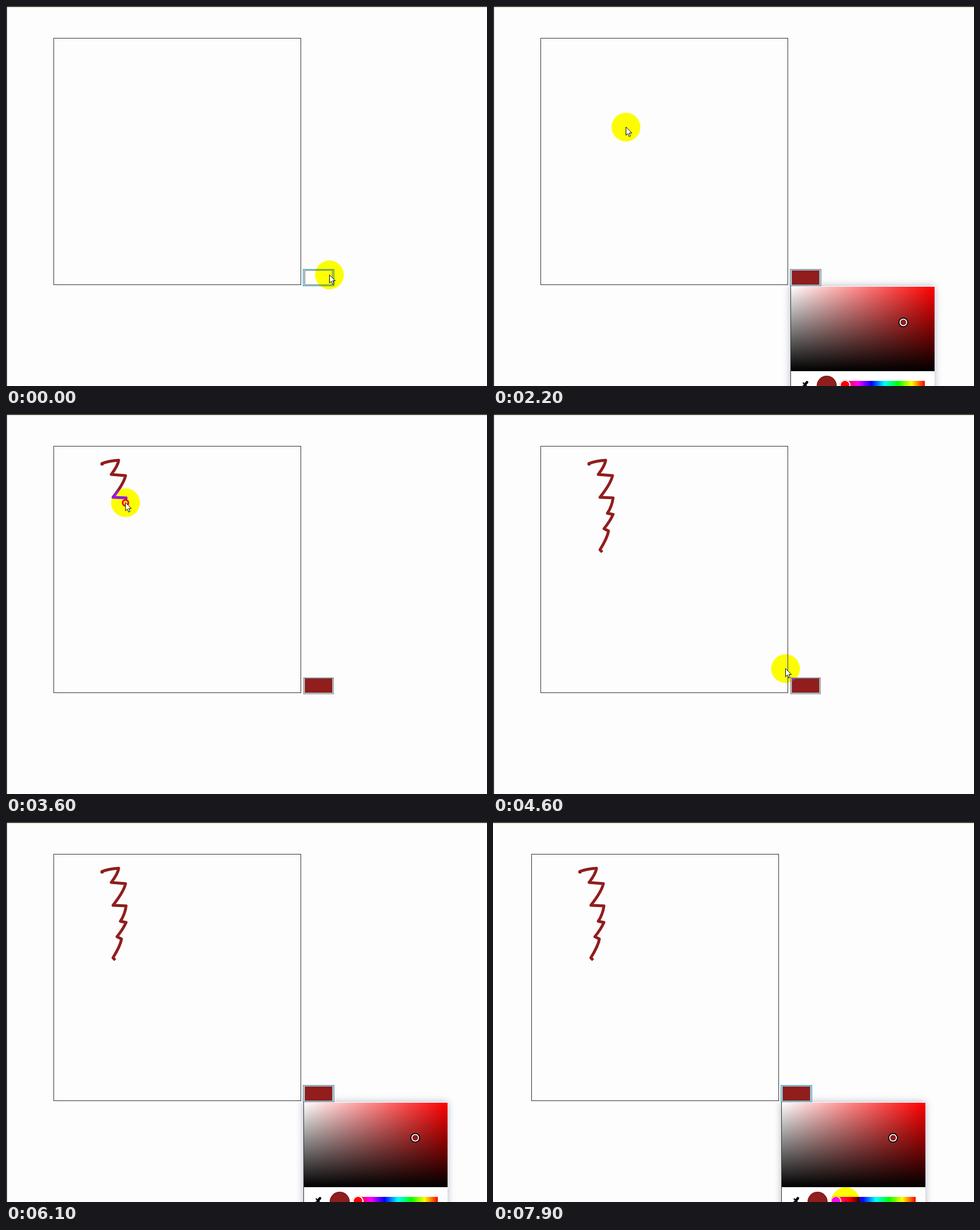
Recreate the animation shown at these times as an HTML page with a canvas. Size 841x666 px, loop 8 s.

```html
<!DOCTYPE html>
<html lang="en">
<head>
<meta charset="utf-8">
<title>Drawing with a colour picker</title>
<style>
  html, body { margin: 0; width: 100%; height: 100%; overflow: hidden; background: #fdfdfd; }
  canvas { display: block; width: 841px; height: 666px; }
</style>
</head>
<body>
<canvas id="stage" width="841" height="666"></canvas>
<script>
const ctx = document.getElementById('stage').getContext('2d');
const LOOP = 8000, STEP = 100;
const INK = '#911d1d';
const PICK = { from: 1000, to: 1800 };
const PEN = { from: 2800, to: 4160 };
const FIELD = { x: 521, y: 492, w: 251, h: 148 };

const scribble = 'M167 87Q180 82 197 81Q196 90 184 106L209 108Q206 122 187 146L210 147' +
  'Q208 162 200 174L210 176Q204 189 194 201L202 205Q200 217 187 238L191 242';
const penPath = document.createElementNS('http://www.w3.org/2000/svg', 'path');
penPath.setAttribute('d', scribble);
const penLength = penPath.getTotalLength();
const inkPath = new Path2D(scribble);
const arrow = new Path2D('M0 0V14.5L3.3 11.5 5.6 16.8 8 15.8 5.7 10.6H10.3Z');

// Where the pointer rests or turns; it eases from one place to the next
const stops = [
  { t: 200, x: 565, y: 471 }, { t: 800, x: 529, y: 484 },
  { t: PICK.from, x: 521, y: 492 }, { t: PICK.to, x: 717, y: 554 },
  { t: 1900, x: 717, y: 554 }, { t: 2200, x: 232, y: 212 },
  { t: PEN.from, x: 167, y: 87 }, { t: PEN.to, x: 191, y: 242 },
  { t: 4600, x: 511, y: 446 }, { t: 4900, x: 545, y: 472 },
  { t: 5400, x: 715, y: 553 }, { t: 6000, x: 616, y: 720 },
  { t: 6700, x: 616, y: 720 }, { t: 7300, x: 510, y: 475 },
  { t: 7900, x: 616, y: 665 }
];

const during = (t, span) => t >= span.from && t < span.to;
const within = (t, from, to) => t >= from && t < to;
const ease = k => k * k * (3 - 2 * k);
const drawn = t => penLength * Math.min(1, (t - PEN.from) / (PEN.to - PEN.from));

function pointer(t) {
  if (during(t, PEN)) return penPath.getPointAtLength(drawn(t));
  const i = stops.findIndex(s => s.t > t);
  if (i < 1) return stops[i < 0 ? stops.length - 1 : 0];
  const a = stops[i - 1], b = stops[i], k = ease((t - a.t) / (b.t - a.t));
  return { x: a.x + (b.x - a.x) * k, y: a.y + (b.y - a.y) * k };
}

function handleAt(t) {
  return pointer(t < 5400 ? Math.max(PICK.from, Math.min(t, PICK.to)) : 5400);
}

function colourAt({ x, y }, t) {
  if (t >= PICK.to) return INK;
  const s = (x - FIELD.x) / FIELD.w, v = 255 * (1 - (y - FIELD.y) / FIELD.h);
  const low = Math.round(v * (1 - s));
  return `rgb(${Math.round(v)},${low},${low})`;
}

function rect(x, y, w, h, fill) {
  ctx.fillStyle = fill;
  ctx.fillRect(x, y, w, h);
}

function frame(x, y, w, h, colour) {
  ctx.strokeStyle = colour;
  ctx.lineWidth = 1;
  ctx.strokeRect(x + 0.5, y + 0.5, w - 1, h - 1);
}

function disc(x, y, r, fill) {
  ctx.beginPath();
  ctx.arc(x, y, r, 0, Math.PI * 2);
  ctx.fillStyle = fill;
  ctx.fill();
}

function ring(x, y, r, colour, width) {
  ctx.beginPath();
  ctx.arc(x, y, r, 0, Math.PI * 2);
  ctx.strokeStyle = colour;
  ctx.lineWidth = width;
  ctx.stroke();
}

function line(x0, y0, x1, y1, width) {
  ctx.beginPath();
  ctx.moveTo(x0, y0);
  ctx.lineTo(x1, y1);
  ctx.strokeStyle = '#000';
  ctx.lineWidth = width;
  ctx.stroke();
}

function gradient(x0, y0, x1, y1, colours) {
  const g = ctx.createLinearGradient(x0, y0, x1, y1);
  colours.forEach((c, i) => g.addColorStop(i / (colours.length - 1), c));
  return g;
}

function drawInk(t) {
  if (t <= PEN.from) return;
  // While the pen moves, the ink trails slightly behind it
  const length = drawn(t) - (t < PEN.to ? 5 : 0);
  ctx.save();
  ctx.lineJoin = 'round';
  ctx.strokeStyle = INK;
  ctx.lineWidth = 5;
  ctx.setLineDash([Math.max(0, length), penLength * 2]);
  ctx.stroke(inkPath);
  ctx.restore();
  disc(168, 87.5, 3, INK);
}

function drawSwatch(t, colour) {
  const idle = within(t, 2700, 4900) || within(t, 6200, 6400);
  const picked = within(t, PICK.to, 6200);
  if (idle) {
    rect(520, 462, 53, 29, '#efefef');
    frame(520, 462, 53, 29, '#767676');
  } else {
    rect(519, 461, 55, 30, picked ? '#c6d6e2' : '#b4dfe9');
    frame(519, 461, 55, 30, picked ? '#5f7f9c' : '#3a98b4');
  }
  rect(522, 463, 49, 26, colour);
  frame(522, 463, 49, 26, '#777');
}

function drawDropper() {
  ctx.lineCap = 'round';
  line(538, 671, 545, 664, 3);
  line(542.5, 660.5, 548.5, 666.5, 2);
  line(546, 663, 549, 659.5, 4.5);
}

function drawPicker(handle, colour) {
  const { x, y, w, h } = FIELD;
  ctx.save();
  ctx.shadowColor = 'rgba(70,70,110,.4)';
  ctx.shadowBlur = 12;
  rect(x - 1, y - 1, w + 1, 220, '#fff');
  ctx.restore();

  ctx.save();
  ctx.beginPath();
  ctx.rect(x - 1, y - 1, w + 1, 220);
  ctx.clip();
  rect(x, y, w, h, gradient(x, 0, x + w, 0, ['#fff', '#f00']));
  rect(x, y, w, h, gradient(0, y, 0, y + h, ['rgba(0,0,0,0)', '#000']));
  rect(x - 1, y - 1, 1, 220, '#333');

  const hx = handle.x + 0.5, hy = handle.y + 0.5;
  disc(hx, hy, 8.5, '#000');
  disc(hx, hy, 6.8, '#fff');
  disc(hx, hy, 5, colour);

  drawDropper();
  disc(583.5, 665.5, 17.5, colour);
  ring(583.5, 665.5, 17, 'rgba(0,0,0,.25)', 1);
  rect(615, 657, 140, 12, gradient(615, 0, 755, 0,
    ['#f00', '#f0f', '#00f', '#0ff', '#0f0', '#ff0', '#f00']));
  disc(615.5, 664.5, 9.8, '#bbb');
  disc(615.5, 664.5, 9.2, '#fff');
  disc(615.5, 664.5, 7.5, '#f00');
  ctx.restore();
}

function drawPointer(t) {
  const { x, y } = pointer(t);
  // Difference with blue turns white into yellow
  ctx.globalCompositeOperation = 'difference';
  disc(x + 0.5, y + 0.3, 25.2, '#00f');
  ctx.globalCompositeOperation = 'source-over';

  if (during(t, PEN) || during(t, PICK)) ring(x + 0.5, y + 0.5, 5, '#f00014', 3);

  ctx.save();
  ctx.translate(x + 0.5, y);
  ctx.fillStyle = '#fff';
  ctx.strokeStyle = '#000';
  ctx.lineWidth = 1;
  ctx.fill(arrow);
  ctx.stroke(arrow);
  ctx.restore();
}

function draw(t) {
  const handle = handleAt(t), colour = colourAt(handle, t);
  const open = within(t, 400, 2700) || within(t, 5000, 6200) || t >= 7100;
  const shifted = t >= 6200;

  rect(0, 0, 841, 666, '#fdfdfd');
  rect(0, 0, 841, 1.6, '#29291a');
  if (!shifted) rect(0, 0, 1.6, 666, '#111');

  ctx.save();
  if (shifted) ctx.translate(-16, 0);
  frame(83, 56, 433, 433, '#333');
  drawInk(t);
  if (open) drawPicker(handle, colour);
  drawSwatch(t, colour);
  ctx.restore();

  drawPointer(t);
}

function tick() {
  draw(Math.floor(performance.now() % LOOP / STEP) * STEP);
  requestAnimationFrame(tick);
}
tick();
</script>
</body>
</html>
```
